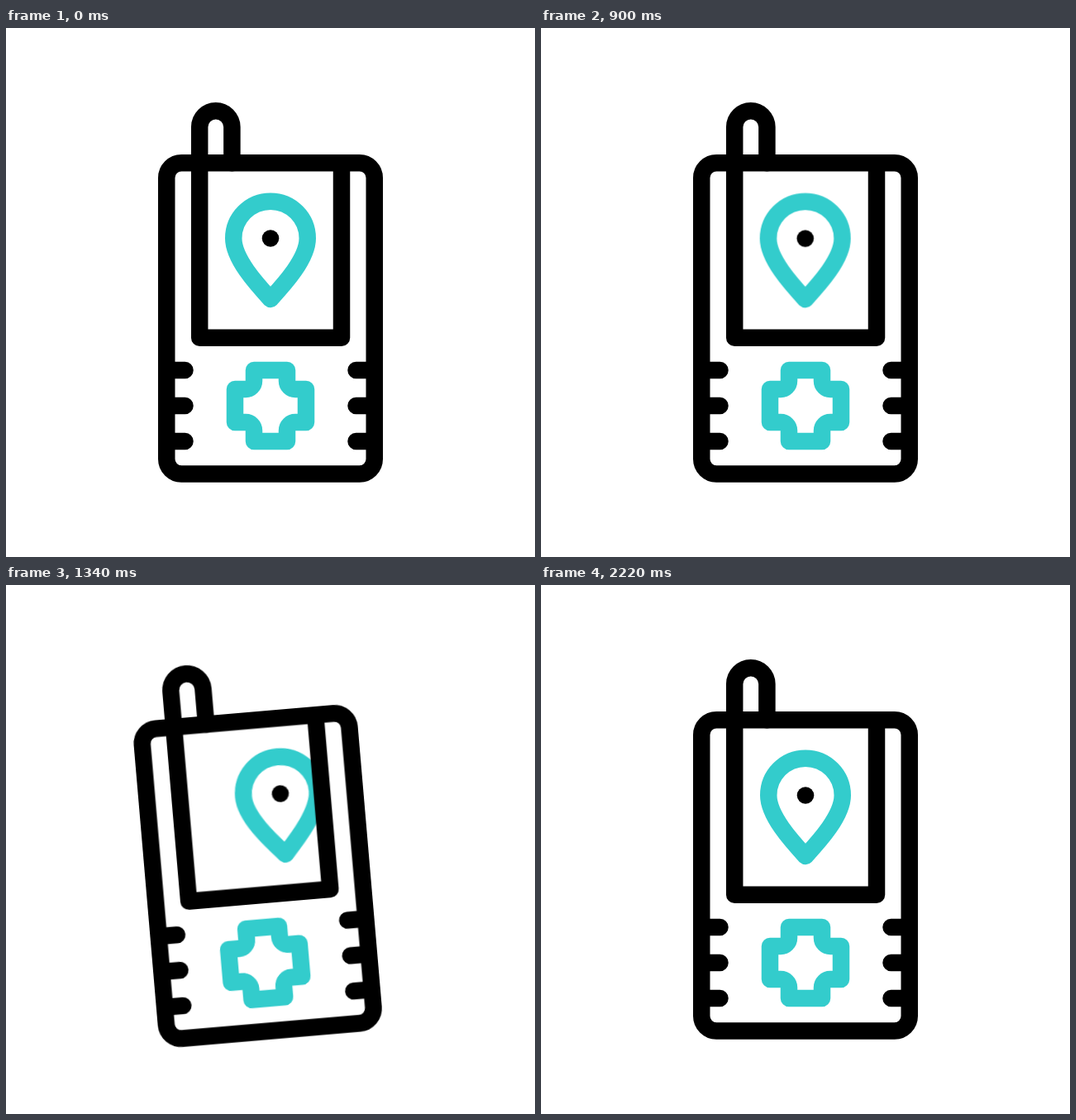
Recreate the animation shown at these times as an HTML page without scripts. Size 640 by 640 pixels, loop 2400 ms.

```html
<!DOCTYPE html>
<html lang="en">
<head>
<meta charset="utf-8">
<title>Handheld locator</title>
<style>
  html, body { margin: 0; width: 100%; height: 100%; overflow: hidden; background: #fff; }
  svg { display: block; width: 100%; height: 100%; }
  .line { fill: none; stroke: #000; stroke-width: 20.5; stroke-linejoin: round; stroke-linecap: round; }
  .teal { stroke: #33cccc; }

  .phone, .leave, .enter, .head, .dot, .cross { animation: 2400ms linear infinite; }
  .phone { transform-origin: 320px 531px; animation-name: tilt; }
  .leave { animation-name: leave; }
  .enter { animation-name: enter; }
  .head { animation-name: head; }
  .dot { animation-name: dot; }
  .cross { vector-effect: non-scaling-stroke; animation-name: pulse; }
  .phone, .head, .dot, .cross { animation-timing-function: cubic-bezier(.33, 0, .67, 1); }

  @keyframes tilt {
    0%, 37.5%, 62.5%, 100% { transform: rotate(0deg); }
    50% { transform: rotate(-9deg); }
  }
  /* one pin slides out lower left while the next comes in from the right */
  @keyframes leave {
    0%, 37.5% { transform: translate(0, 0); }
    62.49% { transform: translate(-180px, 131px); }
    62.5%, 100% { transform: translate(0, 0); }
  }
  @keyframes enter {
    0%, 37.5% { transform: translateX(159px); }
    55.833% { transform: translateX(36px); animation-timing-function: cubic-bezier(.3, .4, .7, 1); }
    62.083%, 62.49% { transform: translateX(0); }
    62.5%, 100% { transform: translateX(159px); }
  }
  /* hop: the head leans right, the tip only rises */
  @keyframes head {
    0%, 8.333%, 37.5%, 62.5%, 91.667%, 100% {
      d: path("M275.25 254.5A44.75 44.75 0 0 1 364.75 254.5C364.75 279 337 309.5 320 328C303 309.5 275.25 279 275.25 254.5Z");
    }
    20.833%, 75% {
      d: path("M290.55 230.1A44.75 44.75 0 0 1 380.05 230.1C380.05 254.6 342 285.1 320 303.6C308 285.1 290.55 254.6 290.55 230.1Z");
    }
  }
  @keyframes dot {
    0%, 8.333%, 37.5%, 62.5%, 91.667%, 100% { transform: translate(0, 0); }
    20.833%, 75% { transform: translate(15.3px, -24.4px); }
  }
  @keyframes pulse {
    0%, 8.333%, 37.5%, 100% { transform: scale(1); }
    20.833% { transform: scale(.775); }
  }
</style>
</head>
<body>
<svg viewBox="0 0 640 640">
  <defs>
    <clipPath id="screen"><rect x="234" y="163" width="172" height="212"/></clipPath>
  </defs>
  <g class="phone">
    <g clip-path="url(#screen)">
      <g class="leave">
        <path class="line teal head" d="M275.25 254.5A44.75 44.75 0 0 1 364.75 254.5C364.75 279 337 309.5 320 328C303 309.5 275.25 279 275.25 254.5Z"/>
        <circle class="dot" cx="320" cy="254.5" r="10.3"/>
      </g>
      <g class="enter">
        <path class="line teal" d="M275.25 254.5A44.75 44.75 0 0 1 364.75 254.5C364.75 279 337 309.5 320 328C303 309.5 275.25 279 275.25 254.5Z"/>
        <circle cx="320" cy="254.5" r="10.3"/>
      </g>
    </g>
    <rect class="line" x="194.25" y="163.25" width="251.5" height="376.25" rx="18"/>
    <path class="line" d="M273.4 163.25V119.8A19.6 19.6 0 0 0 234.2 119.8V374.7H406V163.25"/>
    <path class="line" d="M195 414H216.5M195 457H216.5M195 500H216.5M445 414H423.5M445 457H423.5M445 500H423.5"/>
    <g transform="translate(320 457)">
      <path class="line teal cross" d="M-20-43H20V-30A10 10 0 0 0 30-20H43V20H30A10 10 0 0 0 20 30V43H-20V30A10 10 0 0 0-30 20H-43V-20H-30A10 10 0 0 0-20-30Z"/>
    </g>
  </g>
</svg>
</body>
</html>
```
